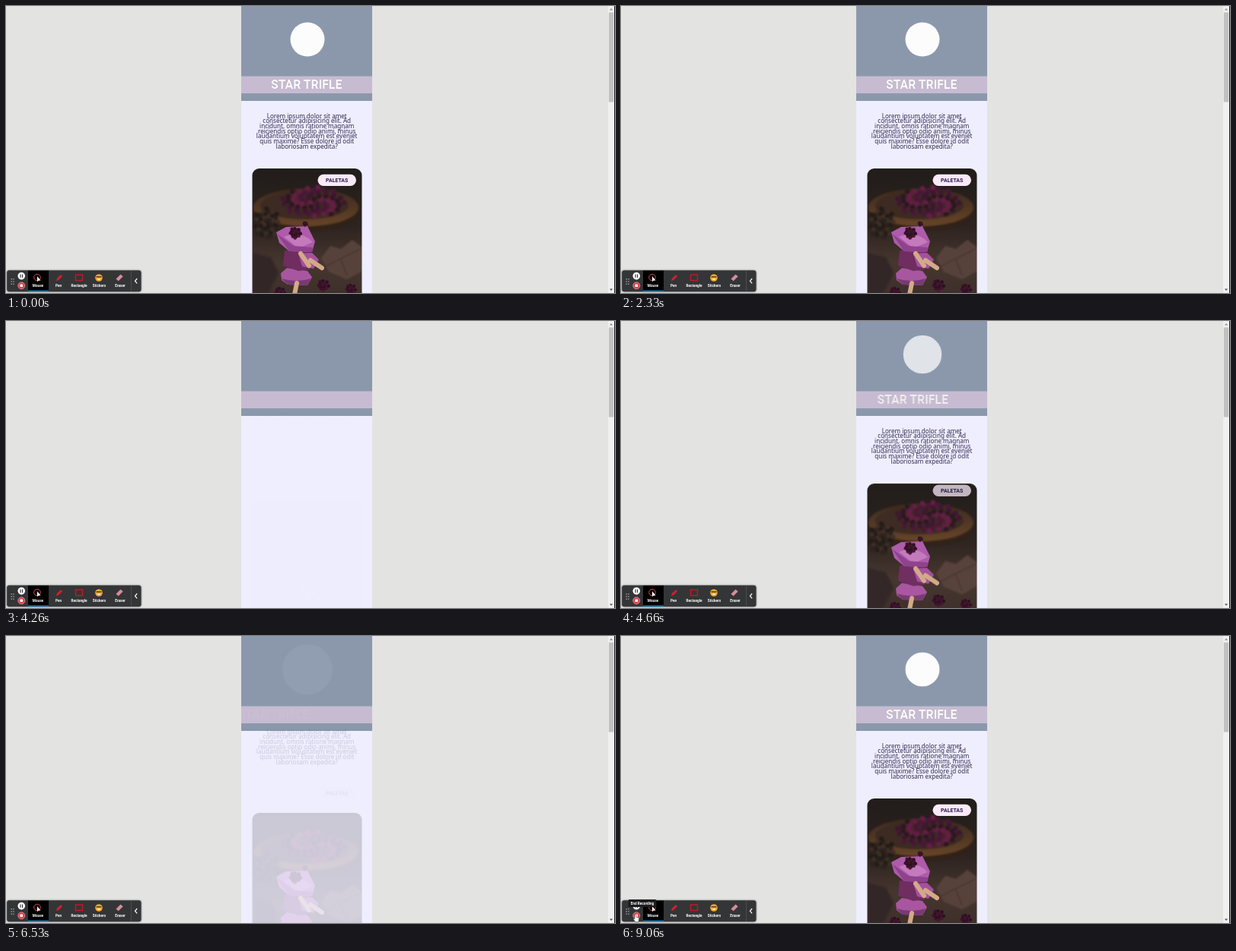
Write an HTML page that moves like this. It is 800 by 378 pixels and loops after 9130 ms.

```html
<!DOCTYPE html>
<html lang="en">
<head>
<meta charset="utf-8">
<title>Ice cream page</title>
<style>
  html, body { margin: 0; width: 100%; height: 100%; overflow: hidden; background: #e3e3e2; }
  svg { display: block; width: 100%; height: 100%; }
  text { text-anchor: middle; }
  .title { font: 700 15.8px Roboto, sans-serif; fill: #fff; filter: drop-shadow(.6px .8px .4px #77708c); }
  .label { font: 700 7px Roboto, sans-serif; fill: #2b1c50; }
  .copy { font: 8.1px "Noto Sans", sans-serif; fill: #35294f; }
  .tools text { font: 700 4.7px Roboto, sans-serif; fill: #fff; }
  .bar { filter: drop-shadow(0 0 1px #0009); }
  .logo { transform-box: fill-box; transform-origin: center; }
</style>
</head>
<body>
<svg viewBox="0 0 800 378" preserveAspectRatio="none">
  <defs>
    <clipPath id="panel"><rect x="309" width="172" height="378"/></clipPath>
    <clipPath id="card"><rect x="323.5" y="214" width="144" height="190" rx="9"/></clipPath>
    <linearGradient id="dusk" x2="0" y2="1">
      <stop offset="0" stop-color="#211d1a"/>
      <stop offset=".4" stop-color="#2d231f"/>
      <stop offset=".65" stop-color="#46362f"/>
      <stop offset="1" stop-color="#3a2b28"/>
    </linearGradient>
    <linearGradient id="wood" x2="0" y2="1">
      <stop offset="0" stop-color="#39291e"/>
      <stop offset="1" stop-color="#674528"/>
    </linearGradient>
    <filter id="soft"><feGaussianBlur stdDeviation="1.1"/></filter>
  </defs>

  <rect width="800" height="378" fill="#e3e3e2"/>
  <g clip-path="url(#panel)">
    <rect x="309" width="172" height="378" fill="#eeeefe"/>
    <rect x="309" width="172" height="125" fill="#8b98ac"/>
    <rect x="309" y="92.5" width="172" height="22.5" fill="#c7bbd1"/>
    <circle class="logo" cx="396" cy="44" r="22.5" fill="#fcfcfd"/>
    <text class="title" x="394.7" y="108.500">STAR TRIFLE</text>
    <g class="copy"></g>
    <g class="photo" clip-path="url(#card)">
      <rect x="323" y="214" width="145" height="190" fill="url(#dusk)"/>
      <g filter="url(#soft)">
        <ellipse cx="394" cy="269" rx="70" ry="27" fill="#302119"/>
        <ellipse cx="394" cy="265" rx="69" ry="25" fill="url(#wood)"/>
        <ellipse cx="392" cy="263" rx="58" ry="18" fill="#3c2a20"/>
        <g class="backdrop"></g>
        <path d="M414 332 426 316 440 320 455 308 468 318 468 349 448 360 424 350Z" fill="#56423a"/>
        <path d="M416 345Q440 332 466 320M440 334 448 355" stroke="#392b27" fill="none"/>
        <path d="M324 325 348 331 358 352 344 378 324 378Z" fill="#302626"/>
      </g>
      <path d="M361 352 369 345 396 349 402 357 396 368 370 367 362 361Z" fill="#a956a0"/>
      <path d="M362 359Q382 365 400 359L396 368 370 367Z" fill="#773a72"/>
      <path d="M366 322 398 323 404 331 399 347 384 349 364 342Z" fill="#6f2d60"/>
      <path d="M384 326 402 325 411 334 404 346 389 343Z" fill="#a450a0"/>
      <path d="M355 298 368 291 396 290 406 310 402 324 372 323 359 312Z" fill="#ae5bab"/>
      <path d="M365 304Q388 295 403 311L384 319Z" fill="#c47abd"/>
      <path d="M356 300 372 323 402 324 404 318 378 316Z" fill="#8f428d"/>
      <path d="M387 326 398 342M400 335 415 345M382 365 379 380" stroke="#d2aa88" stroke-width="6" stroke-linecap="round"/>
      <g class="berries"></g>
    </g>
    <g class="badge">
      <rect x="409.5" y="221.7" width="50.5" height="15.3" rx="7.6" fill="#faeaf8"/>
      <text class="label" x="434.7" y="231.900">PALETAS</text>
    </g>
  </g>

  <rect x="791" width="8" height="378" fill="#f0f0f0"/>
  <rect x="799" width="1" height="378" fill="#1c1c1c"/>
  <rect x="791.8" y="8.5" width="6.4" height="118" fill="#c1c1c1"/>
  <path d="M793 5.5h4l-2-2.5z" fill="#8a8a8a"/>
  <path d="M793 372.5h4l-2 2.5z" fill="#505050"/>

  <g class="tools">
    <rect class="bar" x="1.2" y="348.3" width="176.3" height="28" rx="3" fill="#343537"/>
    <path d="M7.2 359v8M10 359v8" stroke="#bbb" stroke-width="1.3" stroke-dasharray="1.3 1.9"/>
    <circle cx="20.3" cy="355.6" r="4.8" fill="#fff"/>
    <path d="M19 353.5v4.2M21.6 353.5v4.2" stroke="#222" stroke-width="1.1"/>
    <circle cx="20.3" cy="368.3" r="4.5" fill="#db3e48" stroke="#e9a5a8" stroke-width=".7"/>
    <rect x="18.5" y="366.5" width="3.6" height="3.6" rx=".6" fill="#fff"/>
    <rect x="29" y="348.5" width="27" height="27.5" fill="#000"/>
    <rect x="29" y="374.5" width="27" height="1.7" fill="#1676a8"/>
    <circle cx="41" cy="357.5" r="4.3" fill="none" stroke="#d84b50"/>
    <path d="M41 356v7l1.8-1.6 2.8.1z" fill="#fff"/>
    <path d="M66 362l1-3.3 5-4.7 2 2-5 5z" fill="#d71f2b"/>
    <rect x="91.5" y="354" width="9" height="7.5" fill="none" stroke="#c81822" stroke-width="1.4"/>
    <circle cx="122" cy="358" r="4.8" fill="#f2a92e"/>
    <path d="M118.5 356.7h7" stroke="#59381c" stroke-width="1.5"/>
    <path d="M119.5 359.3h5q-2.5 3.5-5 0" fill="#fff"/>
    <path d="M144.5 359.5l6-6 3.2 2.7-6 6z" fill="#d88c9b"/>
    <path d="M164.5 349v27" stroke="#555" stroke-width=".7"/>
    <path d="M172.2 359l-2.7 3.2 2.7 3.2" fill="none" stroke="#fff" stroke-width="1.2"/>
    <g class="names"></g>
    <g class="tip">
      <rect x="9.5" y="347" width="37" height="10" rx="1.5" fill="#1d1d1e"/>
      <text x="28" y="353.6">End Recording</text>
    </g>
  </g>

  <path class="arrow" d="M0 0V8.2L2 6.5 3.3 9.3 4.6 8.7 3.4 6H6Z" fill="#fff" stroke="#333" stroke-width=".7"/>
  <path class="hand" d="M18 367q1-1.5 2 0v3l3 .7q1 .3.7 2l-.7 4h-4.3l-2.5-4q.3-1.3 1.8 0z" fill="#fff" stroke="#333" stroke-width=".6"/>
</svg>

<script>
const LOOP = 9130;
const RELOADS = [4255, 6465];
const BLANK = 100;
const $ = s => document.querySelector(s);

function add(parent, tag, attrs, text = '') {
  const el = document.createElementNS('http://www.w3.org/2000/svg', tag);
  for (const key in attrs) el.setAttribute(key, attrs[key]);
  el.textContent = text;
  parent.append(el);
}

[
  'Lorem ipsum dolor sit amet',
  'consectetur adipisicing elit. Ad',
  'incidunt, omnis ratione magnam',
  'reiciendis optio odio animi, minus',
  'laudantium voluptatem est eveniet',
  'quis maxime? Esse dolore id odit',
  'laboriosam expedita?'
].forEach((line, i) => add($('.copy'), 'text', { x: 395.2, y: 147.5 + i * 6.67 }, line));

Object.entries({ Mouse: 42, Pen: 69, Rectangle: 96, Stickers: 122.5, Eraser: 150 })
  .forEach(([name, x]) => add($('.names'), 'text', { x, y: 370 }, name));

// Dots along a sunflower spiral, squeezed into an ellipse.
function cluster(parent, count, [x, y, rx, ry], r, colors) {
  for (let i = 0; i < count; i++) {
    const d = Math.sqrt(i / count), a = i * 2.4;
    add(parent, 'circle', {
      cx: x + rx * d * Math.cos(a), cy: y + ry * d * Math.sin(a), r,
      fill: colors[i % colors.length]
    });
  }
}

cluster($('.backdrop'), 60, [404, 258, 42, 20], 3.3, ['#4b1737', '#671f46', '#2d1522', '#3d1830']);
cluster($('.backdrop'), 40, [342, 286, 17, 20], 3, ['#221a18', '#3c2d27', '#2b211d']);
for (const [x, y, size] of [[380, 299, 9], [417, 368, 9], [453, 373, 8], [360, 377, 8], [393, 287, 4]])
  cluster($('.berries'), 22, [x, y, size * .8, size * .8], size * .24, ['#2c1020', '#471730', '#3a1329']);

const play = (el, frames) => el.animate(
  frames.map(({ at, ...f }) => ({ offset: at / LOOP, ...f })),
  { duration: LOOP, iterations: Infinity });

function reveal(selector, from, duration) {
  const hidden = { opacity: 0, transform: from };
  const shown = { opacity: 1, transform: from.startsWith('scale') ? 'scale(1)' : 'translate(0px, 0px)' };
  const frames = [{ at: 0, ...shown }];
  for (const start of RELOADS) frames.push(
    { at: start - BLANK, ...shown },
    { at: start - BLANK, ...hidden },
    { at: start, ...hidden, easing: 'ease' },
    { at: start + duration, ...shown });
  play($(selector), [...frames, { at: LOOP, ...shown }]);
}

reveal('.logo', 'scale(1.5)', 900);
reveal('.title', 'translate(-46px, 0px)', 900);
reveal('.badge', 'translate(0px, -24px)', 900);
reveal('.copy', 'translate(0px, -23px)', 450);
reveal('.photo', 'translate(0px, 23px)', 450);

play($('.arrow'), [
  [0, 269, 13], [150, 269, 13], [1200, 326, 119], [1700, 326, 119], [2500, 307, 132],
  [3500, 307, 132], [3720, 200, -15], [8100, 150, -15], [8800, 19, 366], [LOOP, 19, 366]
].map(([at, x, y]) => ({ at, transform: `translate(${x}px, ${y}px)`, easing: 'ease-in-out' })));

function showBetween(selector, from, to) {
  play($(selector), [
    { at: 0, opacity: 0 }, { at: from, opacity: 0 }, { at: from, opacity: 1 },
    { at: to, opacity: 1 }, { at: to, opacity: 0 }, { at: LOOP, opacity: 0 }
  ]);
}
showBetween('.arrow', 0, 8800);
showBetween('.hand', 8800, LOOP);
showBetween('.tip', 8900, LOOP);
</script>
</body>
</html>
```
